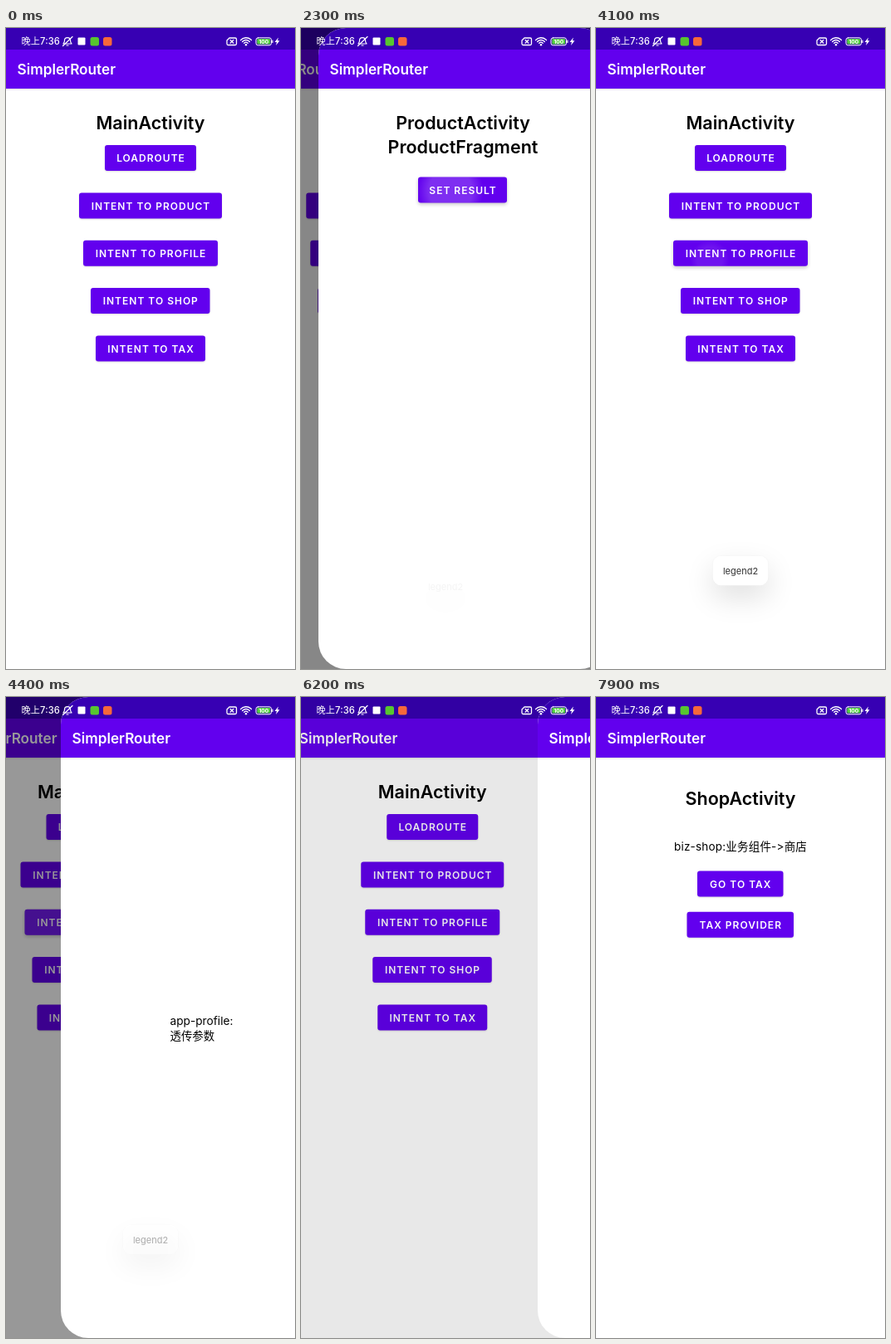
These frames come from a looping animation (348 by 772 pixels, 8 s). An HTML page with a canvas:

```html
<!DOCTYPE html>
<html lang="zh-CN">
<head>
<meta charset="utf-8">
<title>SimplerRouter</title>
<style>
  html, body { margin: 0; width: 100%; height: 100%; overflow: hidden; background: #fff; }
  canvas { display: block; width: 348px; height: 772px; }
</style>
</head>
<body>
<canvas id="stage"></canvas>
<script>
const W = 348, H = 772, LOOP = 8000, STEP = 100;
const FONT = 'Inter, "Noto Sans CJK SC", "Noto Sans CJK", sans-serif';
const PRIMARY = '#6200ee', DARK = '#3700b3';

const canvas = document.getElementById('stage');
const ctx = canvas.getContext('2d');
const dpr = window.devicePixelRatio || 1;
canvas.width = W * dpr;
canvas.height = H * dpr;

const clamp = v => Math.max(0, Math.min(1, v));

// Critically damped spring from 0 to 1, at rest once it is close enough
function spring(ms) {
  const x = Math.max(0, ms) * 0.013;
  const p = 1 - (1 + x) * Math.exp(-x);
  return p > 0.995 ? 1 : p;
}

function text(str, x, y, size, { weight = 400, color = '#000', align = 'center', spacing = 0 } = {}) {
  ctx.font = `${weight} ${size}px ${FONT}`;
  ctx.letterSpacing = spacing + 'px';
  ctx.textAlign = align;
  ctx.textBaseline = 'alphabetic';
  ctx.fillStyle = color;
  ctx.fillText(str, x, y);
}

function box(x, y, w, h, r) {
  ctx.beginPath();
  ctx.roundRect(x, y, w, h, r);
}

function shadow(alpha, blur, dy) {
  ctx.shadowColor = `rgba(0,0,0,${alpha})`;
  ctx.shadowBlur = blur * dpr;
  ctx.shadowOffsetY = dy * dpr;
}

// Buttons: label, left, top, width
const BUTTONS = {
  main: [
    ['LOADROUTE', 119, 141, 110],
    ['INTENT TO PRODUCT', 88, 198.4, 172],
    ['INTENT TO PROFILE', 93, 255.8, 162],
    ['INTENT TO SHOP', 102, 313, 143.5],
    ['INTENT TO TAX', 108, 370.4, 132]
  ],
  product: [['SET RESULT', 120, 179.4, 107]],
  profile: [],
  shop: [
    ['GO TO TAX', 122, 209.6, 103.5],
    ['TAX PROVIDER', 109.5, 258.8, 128.5]
  ]
};

const TAPS = [
  { label: 'INTENT TO PRODUCT', at: 1010, x: 125, y: 215, r: 85 },
  { label: 'SET RESULT', at: 2225, x: 159, y: 196, r: 70 },
  { label: 'INTENT TO PROFILE', at: 4068, x: 137, y: 279, r: 85 },
  { label: 'INTENT TO SHOP', at: 7170, x: 165, y: 330, r: 80 }
];

// Page slides over the main screen between open and close
const VISITS = [
  { page: 'product', open: 1028, close: 2269.5 },
  { page: 'profile', open: 4165, close: 5960 },
  { page: 'shop', open: 7240, close: LOOP + 1000 }
];

function button([label, x, y, w], t) {
  const tap = TAPS.find(k => k.label === label && t >= k.at && t < k.at + 450);
  ctx.save();
  shadow(tap ? 0.22 : 0.14, tap ? 4 : 2, tap ? 2 : 1);
  ctx.fillStyle = PRIMARY;
  box(x, y, w, 31, 3);
  ctx.fill();
  ctx.restore();
  if (tap) {
    const age = t - tap.at;
    const alpha = 0.18 * clamp(age / 75) * clamp((450 - age) / 200);
    const grow = clamp(age / 225);
    const r = tap.r * (1 - (1 - grow) ** 2) + 1;
    ctx.save();
    box(x, y, w, 31, 3);
    ctx.clip();
    const g = ctx.createRadialGradient(tap.x, tap.y, 0, tap.x, tap.y, r);
    g.addColorStop(0, `rgba(255,255,255,${alpha})`);
    g.addColorStop(0.65, `rgba(255,255,255,${alpha})`);
    g.addColorStop(1, 'rgba(255,255,255,0)');
    ctx.fillStyle = g;
    ctx.fillRect(x, y, w, 31);
    ctx.restore();
  }
  text(label, x + w / 2 + 0.5, y + 20.2, 12, { weight: 600, color: '#fff', spacing: 1 });
}

const heading = (str, y) => text(str, 174, y, 21.5, { weight: 600 });

const CONTENT = {
  main() { heading('MainActivity', 122); },
  product() {
    heading('ProductActivity', 122);
    heading('ProductFragment', 151);
  },
  profile() {
    text('app-profile:', 131.5, 395, 13.7, { align: 'left' });
    text('透传参数', 131.5, 413, 13.4, { align: 'left' });
  },
  shop() {
    heading('ShopActivity', 130);
    // Letter spacing also keeps "->" from joining into an arrow
    text('biz-shop:业务组件->商店', 174, 185, 13.5, { spacing: 0.2 });
  }
};

function drawPage(name, x, radius, t) {
  ctx.save();
  ctx.translate(x, 0);
  if (radius) {
    box(0, 0, W, H, radius);
    ctx.clip();
  }
  ctx.fillStyle = '#fff';
  ctx.fillRect(0, 0, W, H);
  ctx.save();
  shadow(0.14, 2, 0.5);
  ctx.fillStyle = PRIMARY;
  ctx.fillRect(-10, 26, W + 20, 47);
  ctx.restore();
  ctx.fillStyle = DARK;
  ctx.fillRect(0, 0, W, 26);
  text('SimplerRouter', 13.5, 56, 17.2, { weight: 600, color: '#fff', align: 'left' });
  CONTENT[name]();
  BUTTONS[name].forEach(b => button(b, t));
  ctx.restore();
}

function line(...p) {
  ctx.beginPath();
  for (let i = 0; i < p.length; i += 2) ctx.lineTo(p[i], p[i + 1]);
  ctx.stroke();
}

function drawStatus() {
  text('晚上7:36', 18.5, 20.4, 11.2, { weight: 500, color: '#fff', align: 'left' });
  ctx.save();
  ctx.strokeStyle = ctx.fillStyle = '#fff';
  ctx.lineWidth = 1.2;
  ctx.lineCap = ctx.lineJoin = 'round';

  // Muted bell
  ctx.beginPath();
  ctx.moveTo(69, 19);
  ctx.quadraticCurveTo(70.5, 17.5, 70.5, 15);
  ctx.bezierCurveTo(70.5, 10.5, 77.5, 10.5, 77.5, 15);
  ctx.quadraticCurveTo(77.5, 17.5, 79, 19);
  ctx.closePath();
  ctx.stroke();
  line(73, 21, 75, 21);
  line(68.5, 21.5, 80, 10.5);

  // Notification squares
  box(86.5, 11.5, 9, 9, 1);
  ctx.fill();
  ctx.fillStyle = '#57c62f';
  box(101.5, 11, 10.5, 10.5, 2.5);
  ctx.fill();
  ctx.fillStyle = '#f7683a';
  box(117, 11, 10.5, 10.5, 2.5);
  ctx.fill();

  // Missing card
  ctx.lineWidth = 1.3;
  ctx.beginPath();
  ctx.moveTo(269, 12);
  ctx.lineTo(276, 12);
  ctx.quadraticCurveTo(277.5, 12, 277.5, 13.5);
  ctx.lineTo(277.5, 19);
  ctx.quadraticCurveTo(277.5, 20.5, 276, 20.5);
  ctx.lineTo(267.5, 20.5);
  ctx.quadraticCurveTo(266, 20.5, 266, 19);
  ctx.lineTo(266, 15);
  ctx.closePath();
  ctx.stroke();
  line(270.2, 14.5, 273.8, 18);
  line(273.8, 14.5, 270.2, 18);

  // Wi-Fi
  ctx.lineWidth = 1.4;
  for (const r of [3, 5.8, 8.6]) {
    ctx.beginPath();
    ctx.arc(289, 20.3, r, -Math.PI * 0.77, -Math.PI * 0.23);
    ctx.stroke();
  }
  ctx.fillStyle = '#fff';
  ctx.beginPath();
  ctx.arc(289, 20.2, 1.2, 0, 7);
  ctx.fill();

  // Battery
  ctx.lineWidth = 1;
  box(301, 11.8, 18.5, 9, 2.5);
  ctx.stroke();
  ctx.fillRect(320.3, 14.6, 1.2, 3.4);
  ctx.fillStyle = '#4fd03c';
  box(302.3, 13.1, 15.9, 6.4, 1.3);
  ctx.fill();
  text('100', 310.3, 18.7, 6.6, { weight: 700, color: '#fff' });

  // Charging bolt
  ctx.fillStyle = '#fff';
  ctx.beginPath();
  [[328, 11.5], [323.5, 17], [326, 17], [325, 21], [329.5, 15.3], [327, 15.3]]
    .forEach(([x, y]) => ctx.lineTo(x, y));
  ctx.fill();
  ctx.restore();
}

function drawToast(t) {
  const alpha = clamp((t - 2290) / 220) * clamp((4500 - t) / 250);
  if (!alpha) return;
  ctx.save();
  ctx.globalAlpha = alpha;
  ctx.translate(0, 20 * (1 - spring(t - 2280)));
  shadow(0.13, 34, 14);
  ctx.fillStyle = '#fff';
  box(140.5, 635.5, 67, 36, 10);
  ctx.fill();
  ctx.shadowColor = 'transparent';
  ctx.strokeStyle = 'rgba(0,0,0,0.04)';
  ctx.lineWidth = 0.6;
  ctx.stroke();
  text('legend2', 174, 658, 11, { color: '#333' });
  ctx.restore();
}

function draw(t) {
  ctx.setTransform(dpr, 0, 0, dpr, 0, 0);
  const visit = VISITS.find(v => t >= v.open && t < v.close + 950);
  const p = visit ? spring(t - visit.open) - spring(t - visit.close) : 0;
  const x = Math.round(W * (1 - p));
  if (x > 0) {
    drawPage('main', (x - W) / 4, 0, t);
    ctx.fillStyle = `rgba(0,0,0,${p / 2})`;
    ctx.fillRect(0, 0, W, H);
  }
  if (x < W) drawPage(visit.page, x, x > 0 ? 33 : 0, t);
  drawStatus();
  drawToast(t);
}

const start = performance.now();
function tick() {
  const t = (performance.now() - start) % LOOP;
  draw(Math.floor(t / STEP) * STEP);
  requestAnimationFrame(tick);
}
tick();
</script>
</body>
</html>
```
